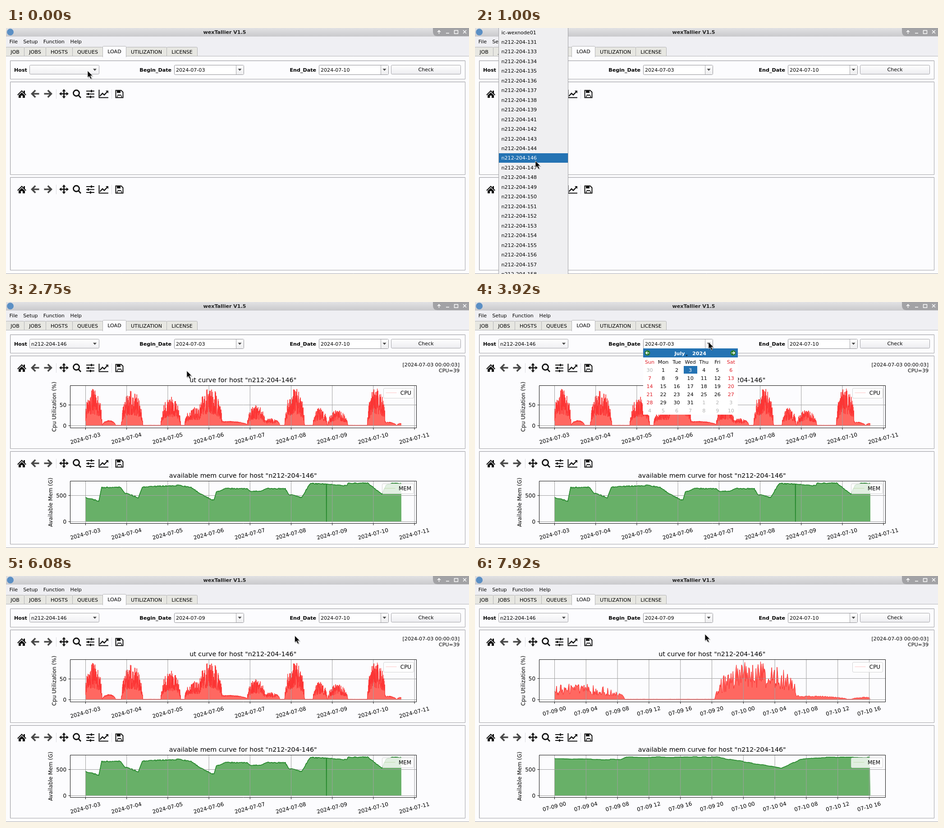
Recreate the animation shown at these times as an HTML page with a canvas. Size 1027 px wide and 546 px high, loop 8000 ms.

```html
<!DOCTYPE html>
<html lang="en">
<head>
<meta charset="utf-8">
<title>Host load</title>
<style>
html, body { margin: 0; width: 100%; height: 100%; overflow: hidden; background: #fcfcfe; }
canvas { display: block; }
</style>
</head>
<body>
<canvas id="stage" width="1027" height="546"></canvas>
<script>
const c = document.getElementById('stage').getContext('2d');
const LOOP = 8000, STEP = 1000 / 12, HOST = 'n212-204-146', BLUE = '#2473b3';
const PANEL_GAP = 212, LEFT = 142.5, RIGHT = 910.5, TOP = 185.5, BOTTOM = 279.5, DATA_LEFT = 176.5;

// ---- helpers ----
function text(s, x, y, { size = 11.1, color = '#000', align = 'left', bold = false, angle = 0, drop = 0 } = {}) {
  c.save();
  c.translate(x, y);
  c.rotate(angle);
  c.font = `${bold ? 'bold ' : ''}${size}px "DejaVu Sans", sans-serif`;
  c.textAlign = align;
  c.fillStyle = color;
  c.fillText(s, 0, drop);
  c.restore();
}
function rect(x, y, w, h, color) { c.fillStyle = color; c.fillRect(x, y, w, h); }
function gradient(y, h, from, to) {
  const g = c.createLinearGradient(0, y, 0, y + h);
  g.addColorStop(0, from);
  g.addColorStop(1, to);
  return g;
}
function path(d, { fill, stroke, width = 1 }) {
  const p = typeof d === 'string' ? new Path2D(d) : d;
  if (fill) { c.fillStyle = fill; c.fill(p); }
  if (stroke) { c.strokeStyle = stroke; c.lineWidth = width; c.stroke(p); }
}
function box(x, y, w, h, radius, style) {
  const p = new Path2D();
  p.roundRect(x, y, w, h, radius);
  path(p, style);
}
function lowerPanel(drawPart) {
  c.save();
  c.translate(0, PANEL_GAP);
  drawPart();
  c.restore();
}
function random(seed) {
  return () => (seed = (seed * 16807) % 2147483647) / 2147483647;
}
const pad = n => String(n).padStart(2, '0');

// ---- load model: one sample every five minutes, time in days since 07-03 ----
const PER_DAY = 288, DAYS = 7.67;

// bursts of work: centre, half width, peak percentage
const bursts = [[.19, .21, 90], [.57, .16, 13], [1.13, .26, 85], [2.07, .24, 70], [2.64, .23, 45],
  [3.02, .3, 94], [3.45, .5, 11], [4.15, .22, 50], [4.5, .22, 18], [5.08, .24, 91], [5.7, .17, 44],
  [6.13, .24, 38], [7.07, .22, 93], [7.35, .2, 9], [7.64, .07, 6]];
// free memory plateaus: time, gigabytes
const freeMem = [[0, 455], [.32, 390], [.39, 648], [.85, 655], [.95, 550], [1.28, 455], [1.38, 660], [2.3, 690],
  [2.58, 645], [2.8, 520], [3.12, 400], [3.18, 560], [3.4, 630], [3.92, 628], [4, 575], [4.25, 575], [4.42, 630],
  [4.86, 625], [4.93, 520], [5.25, 455], [5.46, 730], [6.35, 685], [6.38, 733], [6.86, 733], [7.2, 520],
  [7.3, 690], [7.4, 725], [DAYS, 730]];

const rnd = random(4711);
const samples = [];
for (let i = 0, wobble = 0; i <= DAYS * PER_DAY; i++) {
  const day = i / PER_DAY, r = rnd();
  const peak = Math.max(1.2, ...bursts.map(([mid, half, top]) => top * Math.sqrt(Math.max(0, 1 - ((day - mid) / half) ** 2))));
  const k = Math.max(1, freeMem.findIndex(p => p[0] >= day));
  const [t0, m0] = freeMem[k - 1], [t1, m1] = freeMem[k];
  if (i % 7 === 0) wobble = (rnd() - 0.5) * 18;
  samples.push({
    day,
    cpu: peak * (peak > 15 ? 0.3 + 0.7 * r ** 1.4 : 0.7 + 0.3 * r),
    mem: i === 1686 ? 0 : m0 + (m1 - m0) * (day - t0) / (t1 - t0) + wobble,
  });
}
const ranges = {
  week: { from: 0, tickStep: 91.2, tickCount: 9, labelY: 302.5, cpuScale: 0.92, label: i => `2024-07-${pad(3 + i)}` },
  day: { from: 6, tickStep: 69.8, tickCount: 11, labelY: 299.5, cpuScale: 0.95,
    label: i => `07-${pad(9 + Math.floor(i / 6))} ${pad(i % 6 * 4)}` },
};
const metrics = {
  cpu: {
    title: `ut curve for host "${HOST}"`, yLabel: 'Cpu Utilization (%)', yLabelX: 110.5, zero: 274.5, half: 50,
    fill: '#ff6861', stroke: '#fc3434', width: 1, legend: 'CPU', legendX: 837.5, legendLine: '#ffc4c4',
  },
  mem: {
    title: `available mem curve for host "${HOST}"`, yLabel: 'Available Mem (G)', yLabelX: 102.5, zero: 275, half: 500,
    fill: '#68b068', stroke: '#23862a', width: 1.6, legend: 'MEM', legendX: 834.5, legendLine: '#c2dcb0',
  },
};
function series(range, key, scale) {
  const zero = metrics[key].zero, line = new Path2D(), area = new Path2D();
  const width = 700 / (DAYS - range.from);
  area.moveTo(DATA_LEFT, zero);
  for (const s of samples) {
    if (s.day < range.from) continue;
    const x = DATA_LEFT + (s.day - range.from) * width, y = zero - s[key] * scale;
    line.lineTo(x, y);
    area.lineTo(x, y);
  }
  area.lineTo(DATA_LEFT + 700, zero);
  area.closePath();
  return { line, area, scale };
}
for (const range of Object.values(ranges)) {
  range.cpu = series(range, 'cpu', range.cpuScale);
  range.mem = series(range, 'mem', 0.116);
}

// ---- charts ----
function chart(range, key) {
  const m = metrics[key], { line, area, scale } = range[key];
  const yTicks = [m.half, 0].map(v => [Math.floor(m.zero - v * scale) + 0.5, v]);
  const xTicks = Array.from({ length: range.tickCount }, (_, i) => [DATA_LEFT + i * range.tickStep, range.label(i)]);

  c.save();
  c.beginPath();
  c.rect(0, 167.5, 1027, 160);
  c.clip();
  text(m.title, 525.7, 178, { size: 14.25, align: 'center' });
  c.restore();
  text(m.yLabel, m.yLabelX, 232.5, { size: 11.9, align: 'center', angle: -Math.PI / 2 });

  c.lineJoin = 'round';
  path(area, { fill: m.fill, stroke: m.fill });
  for (const [x] of xTicks) path(`M${x} ${TOP}V${BOTTOM}`, { stroke: '#a0a0a0' });
  for (const [y] of yTicks) path(`M${LEFT} ${y}H${RIGHT}`, { stroke: '#a0a0a0' });
  path(line, { stroke: m.stroke, width: m.width });
  c.lineJoin = 'miter';
  path(`M${LEFT} ${TOP}H${RIGHT}V${BOTTOM}H${LEFT}Z`, { stroke: '#111' });

  for (const [x, label] of xTicks) {
    path(`M${x} ${BOTTOM}v4`, { stroke: '#111' });
    text(label, x - 0.6, range.labelY, { size: 11.9, align: 'center', angle: -Math.PI / 12, drop: 4.3 });
  }
  for (const [y, label] of yTicks) {
    path(`M${LEFT} ${y}h-4`, { stroke: '#111' });
    text(label, 134, y + 4.5, { size: 11.9, align: 'right' });
  }
  box(m.legendX, 191.5, 904.5 - m.legendX, 22, 2.5, { fill: 'rgba(255,255,255,.8)', stroke: '#d4d4d4' });
  path(`M${m.legendX + 5} 201.5h24`, { stroke: m.legendLine });
  text(m.legend, 899, 206, { size: 11.9, align: 'right' });
}

// ---- window parts ----
function toolbar() {
  const black = { fill: '#111' }, grey = { fill: '#484848' };
  path('M25 148L35 138L39 142V139H42V145L45 148L43.500 149.500L35 141L26.500 149.500Z', black);
  path('M28 149.500L35 143L42 149.500V155H37V150H33V155H28Z', black);
  path('M55 146L64 137L66.500 139.500L61.800 144.200H73.500V147.800H61.800L66.500 152.500L64 155Z', grey);
  path('M103 146L94 137L91.500 139.500L96.200 144.200H84.500V147.800H96.200L91.500 152.500L94 155Z', grey);
  path('M111.500 136V157M234.500 136V157', { stroke: '#dcdce0' });
  path('M128.500 140V152M122 146H135', { stroke: '#111', width: 2.6 });
  path('M128.500 135.500l4 5h-8ZM128.500 156.500l4 -5h-8ZM118 146l5 -4v8ZM139 146l-5 -4v8Z', black);
  path('M162.500 144.500a6.500 6.500 0 1 1 -13 0a6.500 6.500 0 1 1 13 0M160.500 149L166 155', { stroke: '#111', width: 2.8 });
  path('M178 140H196M178 146.500H196M178 153H196', { stroke: '#111', width: 1.8 });
  path('M188 137.500h3v5h-3ZM181 144h3v5h-3ZM186 150.500h3v5h-3Z', black);
  path('M206.500 137V154.500H227', { stroke: '#111', width: 2 });
  path('M208.500 151L214 145L218 148.500L225 141', { stroke: '#111', width: 2.4 });
  path('M221 139h6v6Z', black);
  path('M243.500 138.500H255.500L259.500 142.500V154.500H243.500Z', { stroke: '#111', width: 2 });
  path('M246 138H254V144H246ZM246 148H257V150H246ZM246 148V154H247.500V148ZM255.500 148V154H257V148Z', black);
}
function arrowDown(x, y) { path(`M${x - 4} ${y - 2}h8l-4 4.500Z`, { fill: '#444' }); }
function panel(y, h) {
  box(9.5, y + 0.5, 1009, h, 0, { stroke: '#a2a2a6' });
  path(`M10.500 ${y + h - 0.5}V${y + 1.5}H1017.500`, { stroke: '#e6e6ea' });
}
function hostField(value) {
  text('Host', 18, 97, { bold: true });
  box(52.5, 82.5, 154, 20, 2, { fill: gradient(82, 21, '#fff', '#efeff2'), stroke: '#a4a4a8' });
  arrowDown(197, 92.5);
  text(value, 56, 96.5);
}
function dateField(x, label, labelX, value, pressed) {
  text(label, labelX, 97, { bold: true });
  box(x + 0.5, 82.5, 154, 21, 2, { fill: '#fff', stroke: '#929297' });
  rect(x + 138, 83, 16, 20, pressed ? '#cdcdd1' : gradient(83, 20, '#fdfdfd', '#eeeef0'));
  path(`M${x + 137.5} 83V103`, { stroke: '#a6a6aa' });
  arrowDown(x + 145.5, 92.5);
  text(value, x + 4, 97);
}
function checkButton(state) {
  const [from, to, edge] = {
    normal: ['#ffffff', '#ececf0', '#a4a4a8'],
    hover: ['#6498ff', '#4f86fd', '#4468b4'],
    pressed: ['#4a7ae6', '#5c8cf4', '#385a9e'],
  }[state];
  box(854.5, 82.5, 154, 20, 2, { fill: gradient(82, 21, from, to), stroke: edge });
  text('Check', 931.5, 96, { align: 'center' });
}
function tabs() {
  let x = -1;
  for (const s of ['JOB', 'JOBS', 'HOSTS', 'QUEUES', 'LOAD', 'UTILIZATION', 'LICENSE']) {
    c.font = '11.1px "DejaVu Sans", sans-serif';
    const w = Math.round(c.measureText(s).width + 21.4), active = s === 'LOAD';
    box(x + 0.5, active ? 40.5 : 42.5, w, active ? 24 : 20, [2, 2, 0, 0],
      { fill: active ? '#fcfcfe' : '#e7e7e2', stroke: '#b4b4b6' });
    if (active) rect(x + 1, 62, w - 1, 4, '#fcfcfe');
    text(s, x + w / 2 + 0.5, active ? 56 : 57, { align: 'center' });
    x += w;
  }
}
function windowFrame() {
  rect(0, 0, 1027, 546, '#fcfcfe');
  rect(0, 0, 1027, 19, gradient(0, 19, '#e2e2e4', '#c9c9cc'));
  path('M17 9a7.500 7.500 0 1 1 -15 0a7.500 7.500 0 1 1 15 0', { fill: '#5b8fc4' });
  text('wexTallier V1.5', 485, 13, { bold: true, align: 'center', color: '#222' });
  path('M947 0H1027V18H957Q947 18 947 8Z', { fill: '#a2a2a5' });
  path('M960.500 13V6M957 9L960.500 5.500L964 9M976 11.500H983M994.500 5.500H1002.500V12.500H994.500ZM1014 5L1021 12M1021 5L1014 12',
    { stroke: '#fff', width: 1.4 });

  rect(0, 19, 1027, 44, '#efeff3');
  text('File', 7.5, 33.5);
  text('Setup', 38.3, 33.5);
  text('Function', 82.7, 33.5);
  text('Help', 142.6, 33.5);
  path('M0 62.500H1027', { stroke: '#b4b4b8' });
  tabs();
  panel(72, 41);
  panel(119, 206);
  panel(331, 206);
  path('M0 545.500H1027', { stroke: '#a6a6aa' });
  toolbar();
  lowerPanel(toolbar);
}

const hosts = ['ic-wexnode01'];
for (let n = 131; n <= 158; n++) if (![132, 140, 145].includes(n)) hosts.push(`n212-204-${n}`);
function hostList(pointerY) {
  const pitch = 21.46;
  box(52.5, -2.5, 154, 552, 0, { fill: '#efeff1', stroke: '#a0a0a4' });
  const current = Math.floor((pointerY - 2 + pitch / 2 - 10) / pitch);
  hosts.forEach((name, i) => {
    const y = 10 + i * pitch;
    if (i === current) rect(53, Math.round(y - pitch / 2), 153, 21, BLUE);
    text(name, 58.5, y + 3.5, { color: i === current ? '#fff' : '#000' });
  });
}
function calendar(hovered) {
  const colX = i => 387.5 + i * 30.05;
  const header = { bold: true, color: '#fff', align: 'center' };
  rect(373, 103, 210, 147, '#fff');
  rect(373, 103, 210, 20, BLUE);
  for (const [x, d] of [[382.5, -1], [572.5, 1]]) {
    path(`M${x + 6} 113a6 6 0 1 1 -12 0a6 6 0 1 1 12 0`, { fill: '#2d7d32' });
    path(`M${x - 3.5} 113h7M${x + d * 0.5} 110l${d * 3} 3l${-d * 3} 3`, { stroke: '#fff', width: 1.6 });
  }
  text('July', 454, 117.5, header);
  text('2024', 497.5, 117.5, header);
  path('M467 117.500h5l-2.500 3Z', { fill: '#123' });
  const dayColor = i => i % 7 % 6 ? '#000' : '#e01b24';
  ['Sun', 'Mon', 'Tue', 'Wed', 'Thu', 'Fri', 'Sat'].forEach((s, i) =>
    text(s, colX(i), 136.5, { align: 'center', color: dayColor(i) }));
  for (let i = 0; i < 42; i++) {
    const inMonth = i > 0 && i < 32, selected = i === 3;
    if (selected) rect(463, 142, 30, 17, BLUE);
    if (hovered && i === 9) box(432.5, 160.5, 30, 17, 1, { fill: '#cfe4f4', stroke: '#86b4d8' });
    text(i === 0 ? 30 : inMonth ? i : i - 31, colX(i % 7), 154.5 + Math.floor(i / 7) * 18.05,
      { align: 'center', color: selected ? '#fff' : inMonth ? dayColor(i) : '#b2b2b2' });
  }
}

// ---- pointer ----
const moves = [ // start, end, x, y
  [500, 1000, 134, 295], [2480, 2833, 483, 109], [2917, 3250, 518, 89], [3917, 4167, 476, 140],
  [4167, 4333, 490, 165], [4417, 4750, 447, 166], [5917, 6333, 931, 82], [7833, 7916, 510, 129],
];
function pointerAt(t) {
  let x = 181, y = 95;
  for (const [start, end, toX, toY] of moves) {
    const k = Math.min(1, Math.max(0, (t - start) / (end - start)));
    x += (toX - x) * k;
    y += (toY - y) * k;
  }
  return [x, y];
}
function pointer(x, y) {
  c.save();
  c.translate(x, y);
  path('M1.500 2V17L5 14L8 19.500L10.500 18L8 13H13Z', { fill: 'rgba(0,0,0,.25)' });
  path('M0 0V15L3.500 12L6.500 18L9 16.800L6.200 11H11Z', { fill: '#0a0a0a', stroke: '#e8e8e8', width: 0.8 });
  c.restore();
}

function draw(t) {
  const between = (a, b) => t >= a && t < b;
  const [px, py] = pointerAt(t);
  windowFrame();
  hostField(t < 1500 ? '' : HOST);
  dateField(373, 'Begin_Date', 296.3, t < 5160 ? '2024-07-03' : '2024-07-09', between(3410, 3580));
  dateField(694, 'End_Date', 629.5, '2024-07-10', false);
  checkButton(between(6660, 6910) ? 'pressed' : between(6330, 7910) ? 'hover' : 'normal');

  if (t >= 1910) {
    const range = t < 7250 ? ranges.week : ranges.day;
    chart(range, 'cpu');
    lowerPanel(() => chart(range, 'mem'));
  }
  if (t >= 2580) {
    text('[2024-07-03 00:00:03]', 1006, 142.5, { align: 'right' });
    text('CPU=39', 1006, 155.5, { align: 'right' });
  }
  if (between(330, 1500)) hostList(py);
  if (between(3410, 5160)) calendar(t >= 4990);
  if (!between(2330, 2500)) pointer(px, py);
}

function tick() {
  const t = performance.now() % LOOP;
  draw(Math.floor((t + 5) / STEP) * STEP % LOOP);
  requestAnimationFrame(tick);
}
tick();
</script>
</body>
</html>
```
